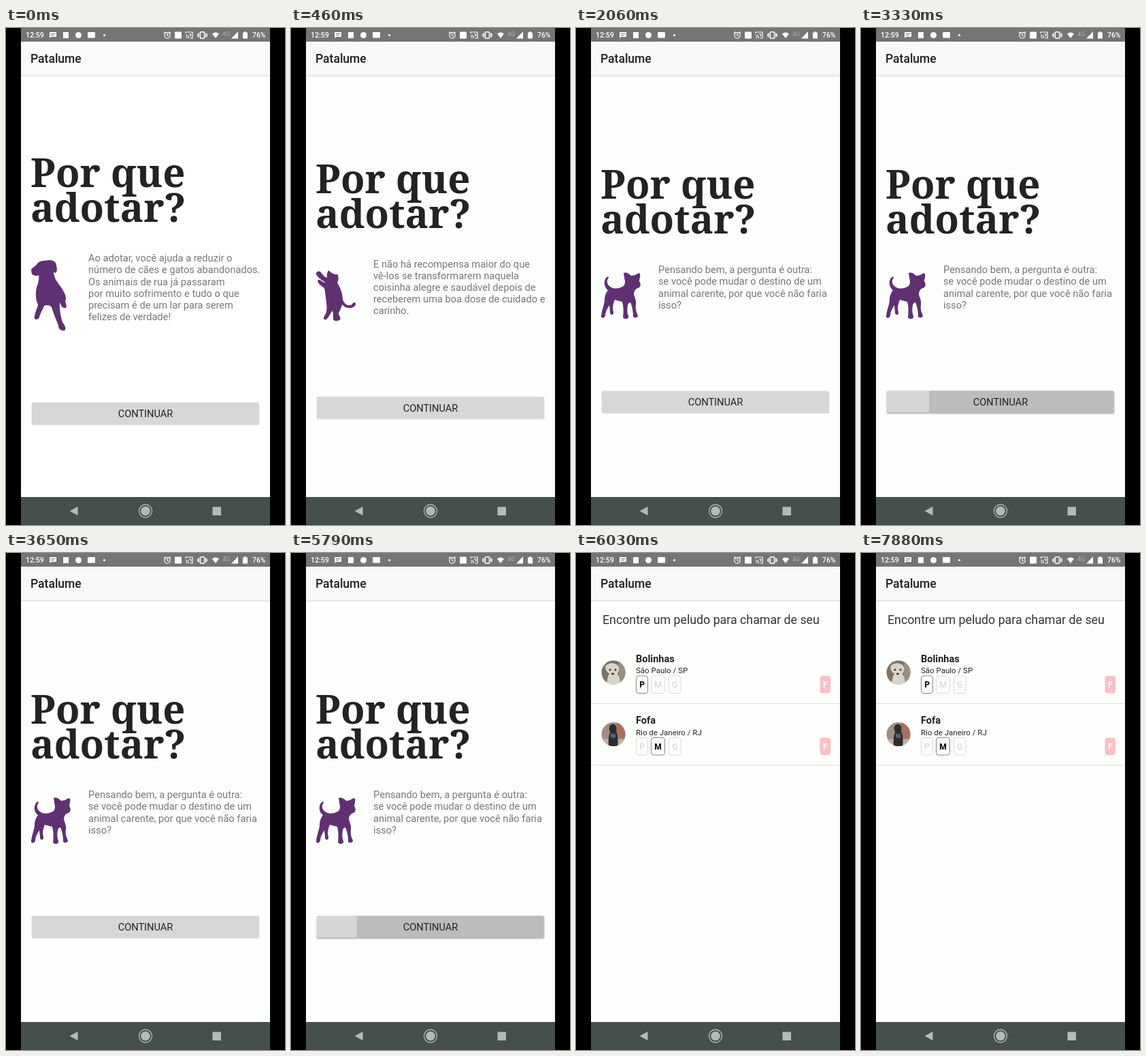
An HTML page for the animation above (8 s loop, 410x728 px).

```html
<!DOCTYPE html>
<html lang="pt-BR">
<head>
<meta charset="utf-8">
<title>Patalume</title>
<style>
html, body { margin: 0; width: 100%; height: 100%; overflow: hidden; background: #000; }
svg { display: block; width: 100%; height: 100%; font-family: Roboto, sans-serif; }
.heading { font: bold 58px "Noto Serif", serif; fill: #222422; }
.copy { font-size: 14.65px; fill: #757775; }
.label { font-size: 14.6px; fill: #222; text-anchor: middle; }
.mid { text-anchor: middle; }
.bold { font-weight: 700; }
.pet { fill: #5f3172; }

.screen { visibility: hidden; animation: 8s step-end infinite; }
#why1 { animation-name: why1; }
#why2 { animation-name: why2; }
#why3 { animation-name: why3; }
#list { animation-name: list; }
@keyframes why1 { 0% { visibility: visible } 4.75%, 100% { visibility: hidden } }
@keyframes why2 { 0% { visibility: hidden } 4.75% { visibility: visible } 23.75%, 100% { visibility: hidden } }
@keyframes why3 { 0% { visibility: hidden } 23.75% { visibility: visible } 74.375%, 100% { visibility: hidden } }
@keyframes list { 0% { visibility: hidden } 74.375%, 100% { visibility: visible } }

/* Button press: the ripple grows to the left, fills, then fades */
.press { opacity: 0; animation: press 8s step-end infinite; }
.ripple { animation: ripple 8s step-end infinite; }
@keyframes press {
  0% { opacity: 0 }
  3.75% { opacity: 1 } 4.75% { opacity: .5 } 5.75% { opacity: 0 }
  21.75% { opacity: 1 } 23.75% { opacity: .6 } 24.75% { opacity: .3 } 25.75% { opacity: 0 }
  41.625% { opacity: 1 } 43.625% { opacity: .6 } 44.625% { opacity: .3 } 45.625% { opacity: 0 }
  72.375% { opacity: 1 } 74.375%, 100% { opacity: 0 }
}
@keyframes ripple {
  0% { transform: translateX(0) }
  3.75% { transform: translateX(42px) } 4.75% { transform: translateX(0) }
  21.75% { transform: translateX(38px) } 22.75% { transform: translateX(0) }
  41.625% { transform: translateX(62px) } 42.625% { transform: translateX(0) }
  72.375% { transform: translateX(59px) } 73.375%, 100% { transform: translateX(0) }
}
</style>
</head>
<body>
<svg viewBox="0 0 410 728" preserveAspectRatio="none">
  <defs>
    <clipPath id="btn"><rect x="38" y="548.5" width="333.500" height="31.500" rx="2"/></clipPath>
    <clipPath id="round"><circle r="17.5"/></clipPath>
    <filter id="soft" x="-5%" y="-30%" width="110%" height="160%"><feGaussianBlur stdDeviation="1.3"/></filter>
    <linearGradient id="edge" x2="0" y2="1">
      <stop stop-color="#dcdddc"/><stop offset="1" stop-color="#fdfffd"/>
    </linearGradient>
  </defs>
  <rect width="410" height="728"/>
  <g id="screens"></g>

  <text x="36" y="51" font-size="17.5" font-weight="500" fill="#1f1f1f">Patalume</text>

  <!-- status bar -->
  <rect x="22" width="366" height="20" fill="#747574"/>
  <g fill="#fff" font-size="10.6" font-weight="500">
    <text x="29" y="14">12:59</text>
    <text x="362" y="14" font-size="10.4">76%</text>
    <text x="318" y="11.5" font-size="9" fill="#a2a3a2">4G</text>
    <path d="M64 6H74V13H66L64 15Z"/>
    <path d="M66 8.5H72.5M66 10.8H70.5" stroke="#747574"/>
    <rect x="84" y="6" width="8" height="9"/>
    <circle cx="106.5" cy="10.5" r="4.5"/>
    <rect x="120" y="6" width="11" height="8.5" rx="1"/>
    <circle cx="144.5" cy="10.5" r="1.6"/>
    <rect x="248" y="5.5" width="10" height="10" rx="1"/>
    <path d="M303 8.5Q308 4.5 313 8.5L308 15Z"/>
    <path d="M341 5V15.5H331Z"/>
    <path d="M348 6.5H350V5.3H353V6.5H355V15.5H348Z"/>
    <rect x="285.5" y="5.7" width="6" height="9.6" rx="1" fill="none" stroke="#fff" stroke-width="1.5"/>
    <g fill="none" stroke="#fff" stroke-width="1.2">
      <circle cx="237" cy="10.8" r="4.2"/>
      <path d="M237 8V11L239 12M232 7.5L234.5 5.5M242 7.5L239.5 5.5"/>
      <path d="M264 8V6H274V15H270.5M264 10.5Q268.5 10.5 268.5 15M264 13Q266 13 266 15M269 9H271.5V12.5"/>
      <path d="M283.3 7V14M281.7 8.5V12.5M293.7 7V14M295.3 8.5V12.5"/>
    </g>
  </g>

  <!-- navigation bar -->
  <rect x="22" y="687" width="366" height="41" fill="#454f4d"/>
  <g fill="#b6b9b7">
    <path d="M93.500 707.500L105.500 701V714Z"/>
    <circle cx="205" cy="707.500" r="6.800"/>
    <circle cx="205" cy="707.500" r="9.500" fill="none" stroke="#b6b9b7" stroke-width="1.300"/>
    <rect x="303.500" y="701.500" width="12.500" height="12.500"/>
  </g>
</svg>
<script>
const pages = [
  { bg: '#fff', bar: '#f9f9f9', shift: 0,
    lines: ['Ao adotar, você ajuda a reduzir o', 'número de cães e gatos abandonados.', 'Os animais de rua já passaram',
      'por muito sofrimento e tudo o que', 'precisam é de um lar para serem', 'felizes de verdade!'],
    pet: 'M37 355C37 351 43 350 46 345C50 340 58 341 64 340C70 340 74 343 74 348C75 353 76 357 72 359L70 357C70 366 76 373 81 380C86 387 90 395 87 400L89 408C89 411 84 411 82 408L79 402C78 412 81 424 83 431C87 436 89 441 86 443C81 444 77 441 77 436C74 428 70 419 67 409C63 405 59 406 56 407C54 413 50 418 49 424C47 428 40 428 42 423C42 418 46 411 47 405C43 397 43 385 46 377C48 371 49 366 48 362C45 364 40 363 38 360Z' },
  { bg: '#fdfffd', bar: '#f7f8f7', shift: 8.5,
    lines: ['E não há recompensa maior do que', 'vê-los se transformarem naquela', 'coisinha alegre e saudável depois de',
      'receberem uma boa dose de cuidado e', 'carinho.'],
    pet: 'M37 361C36 357 41 355 44 358C47 362 50 365 53 366C52 361 54 357 55 355L60 359L65 361L69 361C70 366 70 370 68 373C73 381 76 390 76 398C80 408 88 408 91 403C95 400 96 405 94 407C89 412 80 411 75 405C74 412 70 415 70 419C72 423 74 427 71 428C67 430 61 429 62 425C62 421 62 417 61 414C58 418 55 424 52 427C48 428 47 425 49 422C53 416 53 411 52 403C51 394 50 386 49 381C46 379 42 376 40 373C38 370 41 367 44 370C46 372 49 373 51 373C46 370 40 366 37 361Z' },
  { bg: '#fdfffd', bar: '#f7f8f7', shift: 17,
    lines: ['Pensando bem, a pergunta é outra:', 'se você pode mudar o destino de um', 'animal carente, por que você não faria', 'isso?'],
    pet: 'M70 359C74 357 78 360 81 363L87 362C89 360 93 358 94 360C95 364 93 368 93 371C96 375 95 380 91 381C87 382 85 386 85 390C86 395 89 399 88 405C87 412 89 417 91 421C91 425 86 425 84 423C84 416 83 409 80 402C78 402 77 403 76 406C75 412 75 418 77 422C78 427 71 427 69 424C70 416 70 408 68 401C64 400 60 399 57 398C55 403 53 409 55 416C56 421 50 421 50 417C50 413 49 409 49 406C46 411 43 416 43 421C42 426 36 426 37 421C38 413 41 407 42 400C42 394 43 389 47 384C41 380 40 370 45 365C48 363 49 365 47 367C44 372 47 378 52 380C58 383 65 381 70 378C73 374 72 370 71 366Z' }
];

const text = (x, y, str, attrs = '') => `<text x="${x}" y="${y}" ${attrs}>${str}</text>`;

const backdrop = (bg, bar) => `
  <rect x="22" width="366" height="728" fill="${bg}"/>
  <rect x="22" y="20" width="366" height="49" fill="${bar}"/>
  <rect x="22" y="69" width="366" height="3" fill="url(#edge)"/>`;

const button = `
  <rect x="37.5" y="549.5" width="335" height="32.5" rx="2.5" fill="#e2e3e2"/>
  <rect x="38" y="548.5" width="334" height="32" rx="2" fill="#d6d7d6"/>
  <g class="press">
    <rect x="38" y="550" width="334" height="32" rx="2" fill="#b4b6b4" filter="url(#soft)"/>
    <g clip-path="url(#btn)">
      <rect x="38" y="548" width="334" height="33" fill="#d5d7d5"/>
      <rect class="ripple" x="38" y="548" width="334" height="33" fill="#bbbdba"/>
    </g>
  </g>
  ${text(205, 570, 'CONTINUAR', 'class="label"')}`;

const whyPage = ({ bg, bar, shift, lines, pet }, i) => `
  <g id="why${i + 1}" class="screen">
    ${backdrop(bg, bar)}
    <g transform="translate(0 ${shift})">
      ${text(36, 233, 'Por que', 'class="heading"')}
      ${text(36, 284, 'adotar?', 'class="heading"')}
      ${lines.map((l, n) => text(121, 342.3 + n * 17.1, l, 'class="copy"')).join('')}
    </g>
    <path class="pet" d="${pet}"/>
    <g transform="translate(0 ${-shift})">${button}</g>
  </g>`;

const sizes = [['P', 88.5, 17], ['M', 110.5, 20], ['G', 136.5, 17.5]];
const sizeBox = ([letter, x, w], on) => `
  <rect x="${x}" y="180" width="${w}" height="25.5" rx="3.5" fill="none" stroke="${on ? '#858785' : '#d9dbd9'}"/>
  ${text(x + w / 2, 197, letter, `class="mid ${on ? 'bold' : ''}" font-size="12" fill="${on ? '#000' : '#cdcfcd'}"`)}`;

const row = (y, name, city, size, photo) => `
  <g transform="translate(0 ${y})">
    <g transform="translate(55 175)"><g clip-path="url(#round)">${photo}</g></g>
    ${text(88, 159.5, name, 'class="bold" font-size="14.5" fill="#1d1e1d"')}
    ${text(88, 176, city, 'font-size="11.5" fill="#222"')}
    ${sizes.map(s => sizeBox(s, s[0] === size)).join('')}
    <rect x="358.5" y="180" width="15.5" height="25.5" rx="4" fill="#fdbfc6"/>
    ${text(366.3, 197, 'F', 'class="mid bold" font-size="12" fill="#fff"')}
    <path d="M22 220.5H388" stroke="#dcdedc"/>
  </g>`;

const palePup = `
  <rect x="-18" y="-18" width="36" height="36" fill="#7b7466"/>
  <rect x="8" y="-18" width="10" height="36" fill="#968e80"/>
  <path d="M-10 18Q-9 6 -6 2Q-14 -4 -11 -10Q-3 -17 6 -11Q11 -6 6 2Q10 8 10 18Z" fill="#d9d4c8"/>
  <circle cx="-5" cy="-4" r="1.5" fill="#39332e"/><circle cx="3" cy="-4" r="1.5" fill="#39332e"/>
  <ellipse cx="-1" cy="2" rx="2" ry="1.5" fill="#39332e"/>`;
const darkPup = `
  <rect x="-18" y="-18" width="36" height="36" fill="#a08e84"/>
  <rect x="4" y="-18" width="14" height="36" fill="#a9705f"/>
  <rect x="-18" y="7" width="36" height="11" fill="#b9b3a8"/>
  <path d="M-7 18Q-8 4 -5 -3Q-9 -13 -1 -15Q6 -14 4 -5Q8 5 6 18Z" fill="#2e2c2f"/>
  <path d="M-4 -2Q0 2 3 -2L3 5Q-1 7 -4 4Z" fill="#50657a"/>`;

const listPage = `
  <g id="list" class="screen">
    ${backdrop('#fdfffd', '#f7f8f7')}
    ${text(39, 104.3, 'Encontre um peludo para chamar de seu', 'font-size="17.8" fill="#323332"')}
    ${row(0, 'Bolinhas', 'São Paulo / SP', 'P', palePup)}
    ${row(90.5, 'Fofa', 'Rio de Janeiro / RJ', 'M', darkPup)}
  </g>`;

document.getElementById('screens').innerHTML = pages.map(whyPage).join('') + listPage;
</script>
</body>
</html>
```
